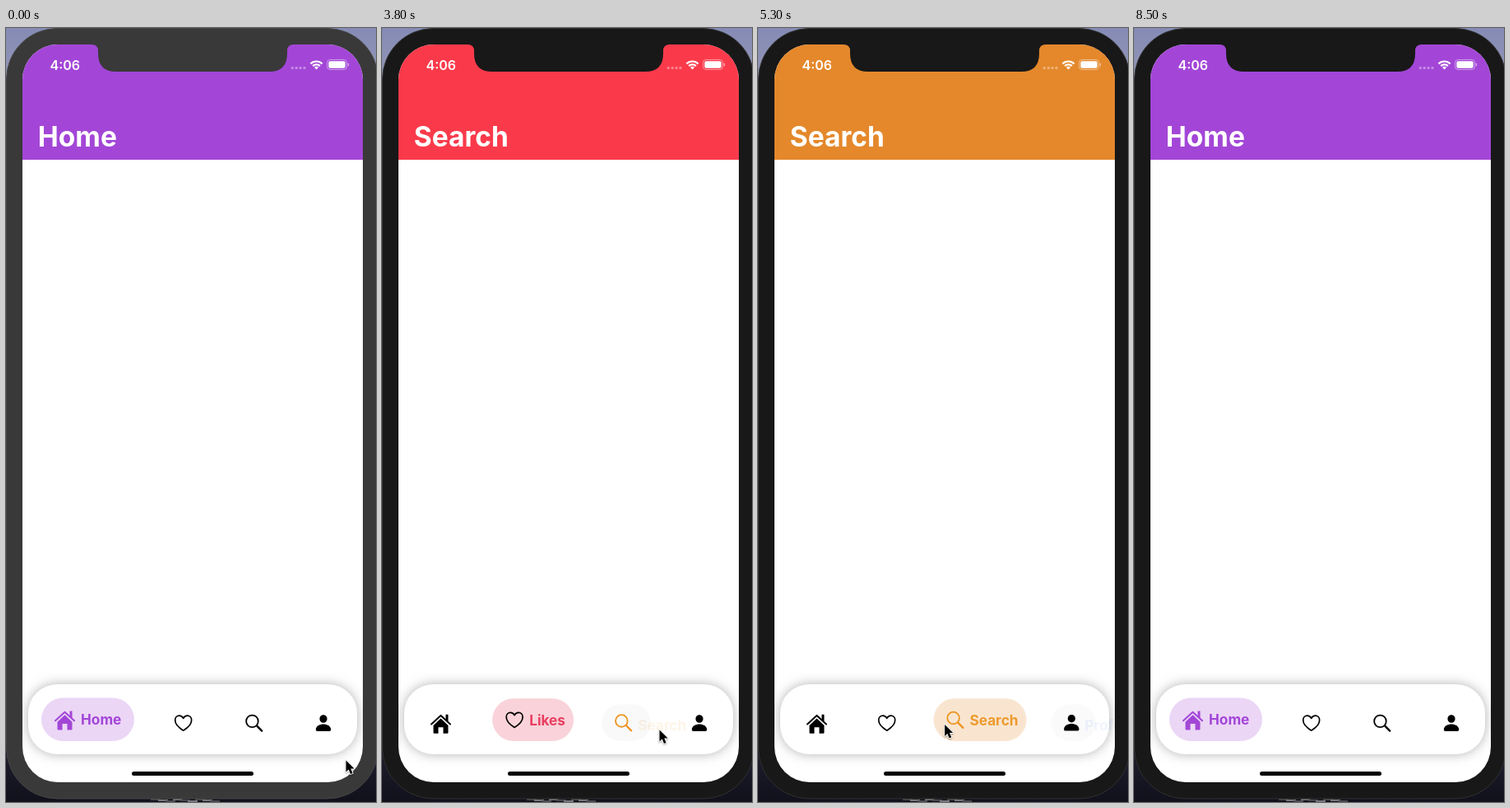
An HTML page with a canvas that plays this animation: 450 by 940 pixels, repeating every 8.6 s.

```html
<!DOCTYPE html>
<html lang="en">
<head>
<meta charset="utf-8">
<title>Tab bar</title>
<style>
  html, body { margin: 0; width: 100%; height: 100%; overflow: hidden; background: #14141f; }
  canvas { display: block; width: 450px; height: 940px; }
</style>
</head>
<body>
<canvas id="stage" width="450" height="940"></canvas>
<script>
const ctx = document.getElementById('stage').getContext('2d');
const LOOP = 8600;
const SWITCH = 350;
const ACTIVATE = 500;
const FONT = 'Inter, Roboto, sans-serif';

const tabs = [
  { name: 'Home', color: [163, 70, 215], label: [163, 70, 215], tint: .22, icon: 25, text: 48, draw: house },
  { name: 'Likes', color: [251, 49, 80], label: [230, 44, 84], tint: .23, icon: 22, text: 42, draw: heart },
  { name: 'Search', color: [243, 138, 26], label: [236, 148, 32], tint: .22, icon: 21, text: 57, draw: lens },
  { name: 'Profile', color: [43, 111, 255], label: [43, 111, 245], tint: .26, icon: 18, text: 54, draw: person }
];

// [time, tab]
const taps = [[-SWITCH, 0], [2858, 1], [3732, 2], [4260, 3], [5010, 2], [5732, 1], [6339, 0]];

// [time, x, y] of the pointer tip
const pointerPath = [
  [80, 413, 889], [300, 408, 880], [500, 408, 880], [1200, 280, 812], [1950, 280, 812],
  [2700, 225, 837], [3100, 225, 837], [3700, 337, 852], [3830, 337, 852], [4230, 388, 846],
  [4330, 388, 846], [4700, 272, 857], [4950, 244, 848], [5150, 244, 848], [5700, 150, 834],
  [5850, 150, 834], [6310, 62, 838], [6390, 62, 838], [6600, 41, 819], [7100, 128, -24]
];

const clamp = v => Math.min(1, Math.max(0, v));
const ease = v => { const u = clamp(v); return u * u * (3 - 2 * u); };
const lerp = (a, b, p) => a + (b - a) * p;
const mix = (a, b, p) => a.map((v, i) => lerp(v, b[i], p));
const rgba = (c, a = 1) => `rgba(${c.map(Math.round).join(',')},${a})`;

function roundRect(x, y, w, h, r, fill) {
  ctx.beginPath();
  ctx.roundRect(x, y, w, h, r);
  if (fill) {
    ctx.fillStyle = fill;
    ctx.fill();
  }
}

function text(str, x, y, size, weight, fill) {
  ctx.font = `${weight} ${size}px ${FONT}`;
  ctx.fillStyle = fill;
  ctx.fillText(str, x, y);
}

function stroke(path, width, color) {
  ctx.lineWidth = width;
  ctx.strokeStyle = color;
  ctx.lineCap = ctx.lineJoin = 'round';
  ctx.stroke(new Path2D(path));
}

function fill(path, color) {
  ctx.fillStyle = color;
  ctx.fill(new Path2D(path));
}

function house(color) {
  stroke('M-11.5 .8L0-9.8L11.5 .8', 2, color);
  fill('M6-11H9V-2L6-5ZM-9 2.2L0-6.2L9 2.2V11Q9 12 8 12H3V4.5H-3V12H-8Q-9 12-9 11Z', color);
}

function heart(color) {
  stroke('M0 9C-5 6-10 2-10-3.6C-10-7-7.6-9-5-9C-2.8-9-1-7.8 0-5.8C1-7.8 2.8-9 5-9C7.6-9 10-7 10-3.6C10 2 5 6 0 9Z', 1.7, color);
}

function lens(color) {
  stroke('M4.9-2.3A7.3 7.3 0 1 1-9.7-2.3A7.3 7.3 0 1 1 4.9-2.3', 1.8, color);
  stroke('M3.2 3.2L9.3 9.5', 2.4, color);
}

function person(color) {
  fill('M4.6-5.2A4.6 4.8 0 1 1-4.6-5.2A4.6 4.8 0 1 1 4.6-5.2M-9.2 7.8C-9 3.3-4.5 1.2 0 1.2C4.5 1.2 9 3.3 9.2 7.8Q9.2 9.7 7.5 9.7H-7.5Q-9.2 9.7-9.2 7.8Z', color);
}

function selection(t) {
  const i = taps.findLastIndex(tap => tap[0] <= t);
  const [start, current] = taps[i];
  return { current, previous: i ? taps[i - 1][1] : current, p: ease((t - start) / SWITCH) };
}

function drawDesktop() {
  const sky = ctx.createLinearGradient(0, 0, 0, 940);
  sky.addColorStop(0, '#858bb5');
  sky.addColorStop(.15, '#a5a3b4');
  sky.addColorStop(.4, '#55576a');
  sky.addColorStop(.75, '#50506a');
  sky.addColorStop(.95, '#1a1a29');
  sky.addColorStop(1, '#11111c');
  ctx.fillStyle = sky;
  ctx.fillRect(0, 0, 450, 940);
  for (let i = 0; i < 9; i++) {
    ctx.fillStyle = i % 2 ? '#77777c' : '#48484e';
    ctx.fillRect(176 + i * 9, 936 + i % 3, 12, 2);
  }
}

function drawBody(bezel, edge) {
  ctx.fillStyle = '#151515';
  for (const [y, h] of [[119, 34], [183, 59], [251, 60]]) ctx.fillRect(0, y, 3, h);
  roundRect(.5, .5, 452, 935.5, 62, bezel);
  ctx.lineWidth = 1;
  ctx.strokeStyle = edge;
  ctx.stroke();
}

function drawStatus() {
  text('4:06', 53.5, 50.5, 16, 600, '#fff');
  ctx.fillStyle = 'rgba(255,255,255,.35)';
  for (let i = 0; i < 4; i++) {
    ctx.beginPath();
    ctx.arc(348.3 + i * 4.9, 48.5, 1.7, 0, 7);
    ctx.fill();
  }
  ctx.save();
  ctx.translate(377.5, 50.5);
  ctx.strokeStyle = '#fff';
  ctx.lineCap = 'butt';
  ctx.lineWidth = 2.2;
  for (const r of [6.2, 10]) {
    ctx.beginPath();
    ctx.arc(0, 0, r, -Math.PI * .75, -Math.PI * .25);
    ctx.stroke();
  }
  fill('M0 0L-2.6-2.8Q0-4.8 2.6-2.8Z', '#fff');
  ctx.restore();
  roundRect(390.5, 38.5, 24, 12, 3.6);
  ctx.lineWidth = 1;
  ctx.strokeStyle = 'rgba(255,255,255,.45)';
  ctx.stroke();
  roundRect(392.3, 40.3, 20.4, 8.4, 2, '#fff');
  roundRect(415.6, 42.6, 1.4, 4, 1, 'rgba(255,255,255,.5)');
}

function drawTabs({ current, previous, p }) {
  const chosen = tabs.map((_, i) => i === current ? (previous === current ? 1 : p) : i === previous ? 1 - p : 0);
  const widths = tabs.map((tab, i) => 32 + tab.icon + chosen[i] * (8 + tab.text));
  const gap = (368 - widths.reduce((a, b) => a + b)) / 3;
  let x = 43;
  tabs.forEach((tab, i) => {
    const s = chosen[i];
    const h = lerp(44, 52.5, s);
    if (s > 0) {
      roundRect(x, 866 - h, widths[i], h, h / 2, rgba(mix([0, 0, 0], tab.color, s), tab.tint * s));
    }
    ctx.save();
    ctx.translate(x + 16 + tab.icon / 2, lerp(844.2, 840, s) + (i === 0 ? .5 : 0));
    tab.draw(i === current ? rgba(tab.label) : '#000');
    ctx.restore();
    if (s > 0) {
      text(tab.name, x + 23 + tab.icon, lerp(853.5, 846, s), 17.2, 700, rgba(tab.label, s));
    }
    x += widths[i] + gap;
  });
}

function drawScreen(state, bezel) {
  ctx.save();
  roundRect(20, 20, 414, 896, 43, '#fff');
  ctx.clip();
  const { current, previous, p } = state;
  ctx.fillStyle = rgba(mix(tabs[previous].color, tabs[current].color, p));
  ctx.fillRect(20, 20, 414, 140);
  fill('M104 19V20Q112 20 112 28V31Q112 53 134 53H320Q342 53 342 31V28Q342 20 350 20V19Z', bezel);
  drawStatus();
  text(tabs[current].name, 38.8, 144, 33.5, 700, '#fff');

  ctx.shadowColor = 'rgba(0,0,0,.3)';
  ctx.shadowBlur = 14;
  roundRect(27, 797, 400, 85, 35, '#fff');
  ctx.shadowColor = 'transparent';
  drawTabs(state);
  roundRect(153, 903, 148, 5, 2.5, '#000');
  ctx.restore();
}

function drawPointer(t) {
  let i = pointerPath.findIndex(key => key[0] > t);
  if (i < 0) return;
  const b = pointerPath[i];
  const a = pointerPath[i - 1] || b;
  const p = a === b ? 0 : ease((t - a[0]) / (b[0] - a[0]));
  ctx.save();
  ctx.translate(lerp(a[1], b[1], p), lerp(a[2], b[2], p));
  const arrow = 'M.5 .5V14.5L3.7 11.6L6 17L8.6 15.9L6.3 10.6H10.6Z';
  ctx.shadowColor = 'rgba(0,0,0,.35)';
  ctx.shadowBlur = 2;
  ctx.shadowOffsetY = 1;
  stroke(arrow, 1.8, '#fff');
  ctx.shadowColor = 'transparent';
  fill(arrow, '#000');
  ctx.restore();
}

function render(now) {
  const t = now % LOOP;
  const active = t >= ACTIVATE;
  const bezel = active ? '#181818' : '#393939';
  drawDesktop();
  drawBody(bezel, active ? '#303030' : '#454545');
  drawScreen(selection(t), bezel);
  drawPointer(t);
}

const begin = performance.now();
function tick() {
  render(performance.now() - begin);
  requestAnimationFrame(tick);
}
tick();
</script>
</body>
</html>
```
